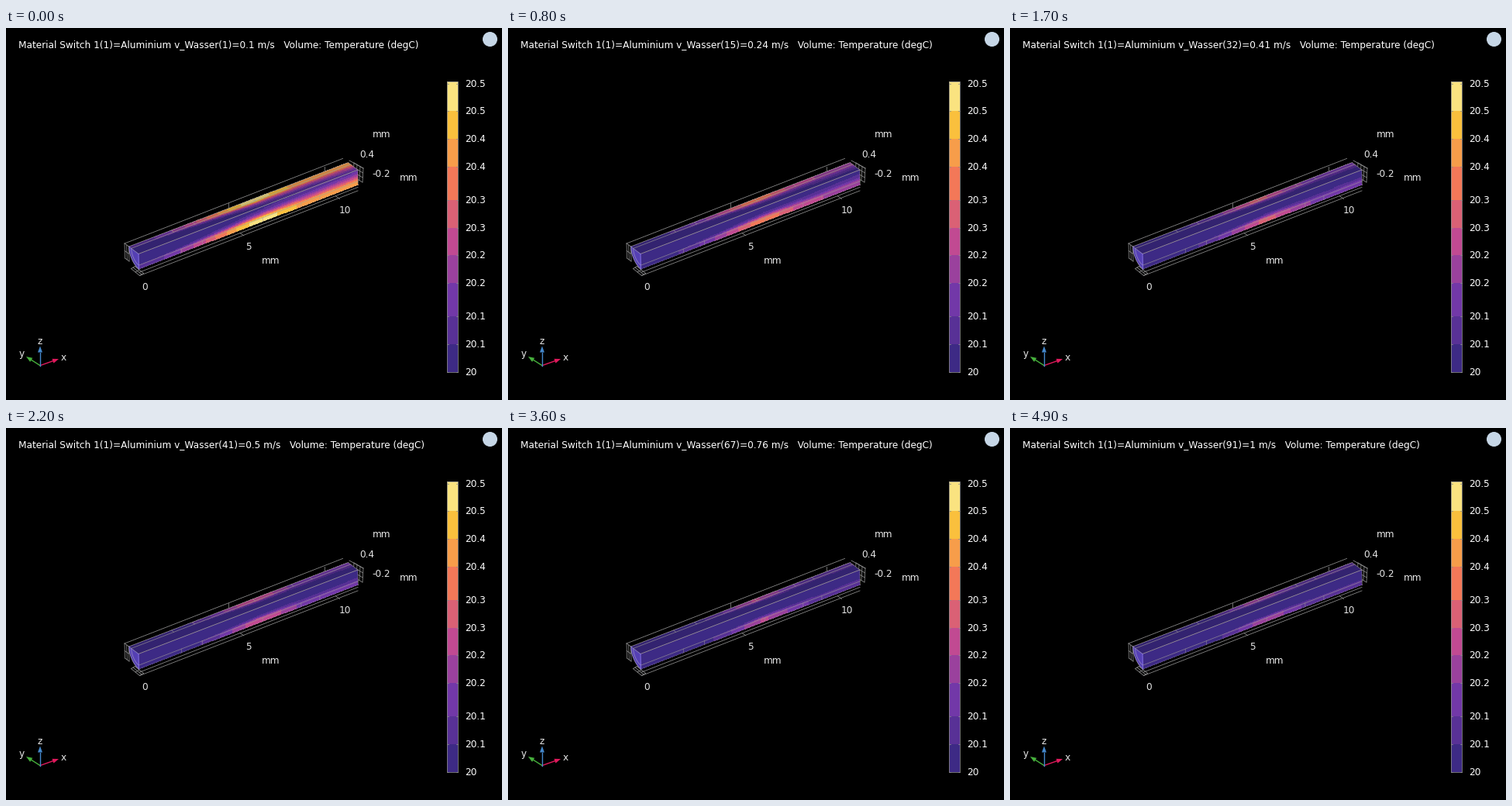
A matplotlib script for the animation above (5000 ms loop, 640 by 480 pixels).

```python
import numpy as np
import matplotlib.pyplot as plt
from matplotlib.animation import FuncAnimation
from matplotlib.colors import LinearSegmentedColormap, ListedColormap
from matplotlib.patches import Circle, Polygon, Rectangle

FRAMES, INTERVAL = 50, 100
PX = 0.9  # points per pixel at 80 dpi
WALL = 0.75  # relative radius where the fluid meets the metal

KEY_COLORS = ["#3d2a85", "#7338a8", "#c14a92", "#f37858", "#fac03c", "#fae380"]
KEY_BANDS = np.array([0, 2, 4, 6, 8, 9]) / 9
HEAT = LinearSegmentedColormap.from_list("heat", list(zip(KEY_BANDS, KEY_COLORS)))
BANDS = HEAT(np.linspace(0, 1, 10))[:, :3]

# Inlet points of the rod's three long edges, and their run to the outlet.
AXIS, BOTTOM, BACK = np.array([(171, 291.5), (171.5, 311), (158.5, 282)])
RUN = np.array((283, -108.5))

plt.rcParams["font.family"] = "DejaVu Sans"
fig = plt.figure(figsize=(8, 6), dpi=80, facecolor="black")
ax = fig.add_axes([0, 0, 1, 1])
ax.set_xlim(0, 640)
ax.set_ylim(480, 0)
ax.axis("off")


def label(x, y, text, color="#e6e6e6", ha="center"):
    """Write 12 px text whose capitals are centred on y."""
    return ax.text(x, y + 4, text, color=color, size=12.1 * PX, ha=ha, va="baseline")


def line(points, color="#8a8a8a", width=0.8, alpha=1, z=4):
    ax.plot(*np.transpose(points), color=color, lw=width * PX, alpha=alpha, zorder=z)


def on_face(outer, s, r):
    """Point on a cut face at length s and radius r, both 0 to 1."""
    s, r = np.asarray(s)[..., None], np.asarray(r)[..., None]
    return AXIS + s * RUN + r * (outer - AXIS)


S, R = np.meshgrid(np.linspace(0, 1, 221), np.linspace(0, 1, 31))
S_MID = (S[1:, 1:] + S[:-1, :-1]) / 2
R_MID = (R[1:, 1:] + R[:-1, :-1]) / 2


def temperature(v):
    """Relative temperature on a cut face for flow speed v in m/s."""
    q = v / 0.1
    peak, outlet = 0.95 * q**-0.42, 0.74 * q**-0.72
    d = S_MID - 0.56
    upstream = peak * np.exp(-(np.abs(d) / (0.338 * q**-0.3)) ** 1.6)
    downstream = outlet + (peak - outlet) * np.exp(-((d / 0.14) ** 2))
    wall = np.where(d < 0, upstream, downstream)
    layer = 0.02 + 0.5 * S_MID * q**-0.4
    depth = np.maximum(WALL - R_MID, 0)
    return wall * np.exp(-((depth / layer) ** 1.2))


def draw_face(outer, shade):
    p = on_face(outer, S, R)
    return ax.pcolormesh(p[..., 0], p[..., 1], np.zeros_like(S_MID), vmin=0, vmax=1,
                         cmap=ListedColormap(BANDS * shade), antialiased=False, zorder=2)


def draw_edges(outer, rim_alpha):
    line(on_face(outer, [0, 1], [1, 1]), "#a09a98", alpha=rim_alpha)
    line(on_face(outer, [0, 1], [WALL, WALL]), "#a09a98", alpha=0.7)
    line(on_face(outer, [1, 1], [0, 1]), "#a09a98", alpha=0.6)
    for s in (0.194, 0.29, 0.565, 0.74, 0.825):
        line(on_face(outer, [s, s], [WALL, 1]), "#a09a98", alpha=0.6)


def draw_cap():
    angle = np.linspace(0, np.pi / 2, 24)[:, None]
    arc = np.cos(angle) * (BACK - AXIS) + np.sin(angle) * (BOTTOM - AXIS)
    ax.add_patch(Polygon(np.vstack([AXIS, AXIS + arc]), fc="#5540b4", ec="none", zorder=3))
    line(AXIS + arc, "#9a92b8")
    line(AXIS + WALL * arc, "#8f84c0")
    line([BACK, AXIS], "#8f84c0")
    line([AXIS, BOTTOM], "#8470e4", 1)


def draw_grid(origin, u, v, n):
    """Lattice of n by n cells spanned by u and v."""
    origin, u, v = map(np.array, (origin, u, v))
    for t in np.linspace(0, 1, n + 1):
        line([origin + t * u, origin + t * u + v], z=1)
        line([origin + t * v, origin + t * v + u], z=1)


def draw_box():
    top, floor = np.array([(153, 278), (172.5, 319.5)])
    draw_grid(top, (0.5, 19), (5.5, 4), 2)
    draw_grid(floor, (-11, -9), (5, -3), 2)
    draw_grid((461, 181), (-1, 18), (-12, -7), 3)
    line([(443, 171), (461, 181)], z=1)
    for start in (top, floor, floor - (0, 4.5)):
        line([start, start + RUN * (0.995, 1.01)], z=1)
    for t, text in ((0, "0"), (0.475, "5"), (0.912, "10")):
        if t:
            line([top + t * RUN, top + t * RUN + (0, 8)], z=1)
            line([floor + t * RUN, floor + t * RUN - (5, 3.5)], z=1)
        label(*(floor + t * RUN + (6.5, 14.5)), text)
    label(341.5, 300, "mm")
    label(484.5, 137, "mm")
    label(519.5, 193, "mm")
    label(465.5, 163, "0.4")
    label(484, 188, "-0.2")


def draw_colorbar():
    left, width, top, bottom = 568.5, 14.5, 68.5, 443.5
    edge = [bottom - 35.8 * i - 7 * ((i + 1) // 4) for i in range(11)]
    ax.add_patch(Rectangle((left, top), width, bottom - top, fc=BANDS[-1], ec="none"))
    for color, low, high in zip(BANDS[:-1], edge, edge[1:]):
        ax.add_patch(Rectangle((left, high), width, low - high, fc=color, ec="none"))
    ax.add_patch(Rectangle((left, top), width, bottom - top, fill=False,
                           ec="#8a8a8a", lw=0.8 * PX))
    for i, y in enumerate(edge):
        line([(left, y), (left + 2, y)])
        line([(left + width - 2, y), (left + width, y)])
        label(592.5, y, f"20.{(i + 1) // 2}" if i else "20", "white", "left")


def draw_triad():
    origin = np.array((44, 435.5))
    for name, tip, color in (("x", (68, 427), "#e0195c"), ("y", (26, 424), "#46b03c"),
                             ("z", (44, 410.5), "#4488cc")):
        u = (tip - origin) / np.hypot(*(tip - origin))
        side, base = 3 * np.array((-u[1], u[0])), tip - 8 * u
        line([origin, base], color, 1.4)
        ax.add_patch(Polygon([tip, base + side, base - side], fc=color, ec="none", zorder=5))
        label(*(tip + 7 * u), name)


front = draw_face(BOTTOM, 1.0)
top_face = draw_face(BACK, 0.84)
draw_edges(BOTTOM, 0.3)
draw_edges(BACK, 0.8)
line([AXIS, AXIS + RUN], "#b0a8a0", alpha=0.85)
draw_cap()
draw_box()
draw_colorbar()
draw_triad()
ax.add_patch(Circle((624.5, 14.5), 9.5, fc="#c6d6e6", ec="none"))
title = label(15.5, 22, "", "white", "left")


def update(frame):
    step = 90 * frame // (FRAMES - 1)
    v = round(0.1 + 0.01 * step, 2)
    title.set_text(f"Material Switch 1(1)=Aluminium v_Wasser({step + 1})={v:g} m/s"
                   "   Volume: Temperature (degC)")
    field = temperature(v)
    front.set_array(field)
    top_face.set_array(field)
    return front, top_face, title


anim = FuncAnimation(fig, update, frames=FRAMES, interval=INTERVAL, repeat=True, repeat_delay=0)
plt.show()
```
